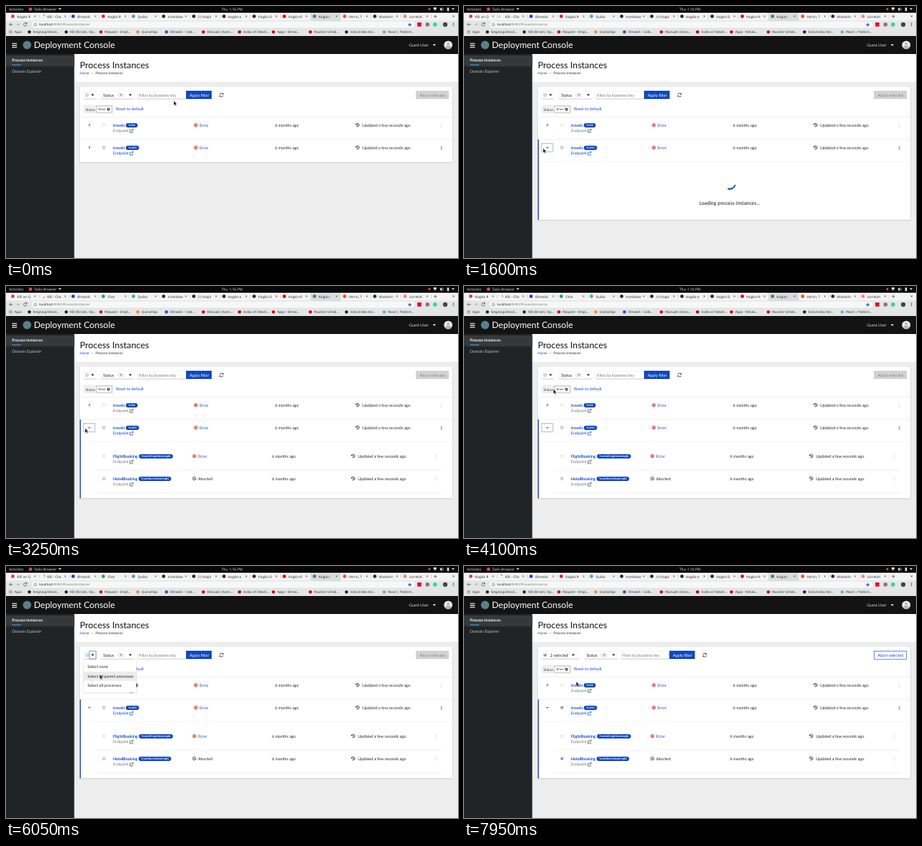
Write an HTML page that moves like this. It is 600 by 336 pixels and loops after 8000 ms.

```html
<!DOCTYPE html>
<html lang="en">
<head>
<meta charset="utf-8">
<title>Process Instances</title>
<style>
  html, body { margin: 0; width: 100%; height: 100%; overflow: hidden; background: #ededed; }
  svg { display: block; width: 100vw; height: 100vh; }
  text { font-family: Lato, sans-serif; white-space: pre; text-rendering: geometricPrecision; }
  .ui { font-family: "Noto Sans", sans-serif; }
  .mono { font-family: "Noto Sans Mono", monospace; }
</style>
</head>
<body>
<svg viewBox="0 0 600 336">
  <g id="scene"></g>
  <path id="tabSpinner" d="M0-2.2A2.2 2.2 0 0 1 2.2 0" fill="none" stroke="#777" stroke-width=".8"/>
  <path id="spinner" d="M0-8A8 8 0 0 1 8 0" fill="none" stroke="#1048c0" stroke-width="1.8"/>
  <path id="cursor" d="M0 0V6.2L1.4 5 2.4 7.2 3.4 6.7 2.5 4.6H4.3Z" fill="#111" stroke="#fff" stroke-width=".4"/>
</svg>
<script>
const LOOP = 8000;
const BLUE = '#1048c0', INK = '#222', GREY = '#777', RED = '#c9190b', CHROME = '#e4e6e6', DARK = '#24292e';
const $ = id => document.getElementById(id);

// Shape helpers, each returning SVG markup
const rect = (x, y, w, h, fill, extra = '') =>
  `<rect x="${x}" y="${y}" width="${w}" height="${h}" fill="${fill}" ${extra}/>`;
const frame = (x, y, w, h, stroke, fill = 'none', width = .6) =>
  rect(x, y, w, h, fill, `stroke="${stroke}" stroke-width="${width}"`);
const dot = (x, y, r, fill) => `<circle cx="${x}" cy="${y}" r="${r}" fill="${fill}"/>`;
const line = (d, stroke, width = .7) =>
  `<path d="${d}" fill="none" stroke="${stroke}" stroke-width="${width}"/>`;
const text = (x, y, str, fill = INK, size = 5.3, extra = '') =>
  `<text x="${x}" y="${y}" fill="${fill}" font-size="${size}" ${extra}>${str}</text>`;
const ui = (x, y, str, fill = '#333', size = 4.4) => text(x, y, str, fill, size, 'class="ui"');
const caret = (x, y, fill = INK) => `<path d="M${x - 2} ${y - 1}h4l-2 2.3z" fill="${fill}"/>`;
const shadow = (x, y, w, h) =>
  rect(x - .7, y, w + 1.4, h + 1.2, '#000', 'opacity=".1"') + rect(x, y, w, h, '#fff');

function checkbox(x, y, enabled, checked) {
  return frame(x - 1.7, y - 1.7, 3.4, 3.4, enabled ? '#b0b0b0' : '#ddd', enabled ? '#dcdcdc' : '#f4f4f4', .5)
    + (checked ? line(`M${x - 1.2} ${y}l1 1.1 1.7-2.2`, INK, .9) : '');
}

function kebab(x, y, enabled) {
  return [-1.8, 0, 1.8].map(d => dot(x, y + d, .6, enabled ? INK : '#bbb')).join('');
}

function historyIcon(x, y) {
  return line(`M${x - 2} ${y - 1.2}A2.2 2.2 0 1 1 ${x - 1.6} ${y + 1.5}M${x} ${y - 1.3}v1.5l1 .6`, INK, .75)
    + `<path d="M${x - 2.8} ${y - 2.4}v2.1h2.1z" fill="${INK}"/>`;
}

function linkIcon(x, y, stroke) {
  return line(`M${x} ${y - 1.3}h-2v3.7h3.7v-1.8M${x - .4} ${y + .8}l2.6-2.9M${x + .6} ${y - 2.2}h1.8v1.8`, stroke, .65);
}

const errorIcon = (x, y) =>
  `<circle cx="${x}" cy="${y}" r="2.1" fill="none" stroke="${RED}" stroke-width=".8"/>`
  + line(`M${x - .9} ${y - .9}l1.8 1.8m0-1.8l-1.8 1.8`, RED, .9);
const abortedIcon = (x, y) =>
  `<circle cx="${x}" cy="${y}" r="2.1" fill="none" stroke="${INK}" stroke-width=".7"/>`
  + line(`M${x - 1.4} ${y - 1.4}l2.8 2.8`, INK);

function browser(s) {
  const tabs = [
    ['#d44638', s.mailTitle], [null, 'KIE - Cha'], ['#2b3fb0', 'Elmwick'],
    s.chat ? ['#25a06b', 'Chat'] : ['#e0185e', 'Kogito R'], ['#37b58b', 'Quibo'],
    [DARK, 'markdow'], [DARK, '(1) Kogit'], [DARK, 'kogito-a'], [DARK, 'Kogito D'],
    ['#d00', 'Kogito-R'], ['#4d7480', 'Kogito -'], ['#ee4b2b', 'Verrin, T'],
    [DARK, 'Masterin'], ['#f08080', 'correlati']
  ];
  const bookmarks = [
    [11, 'Apps', null], [36, 'kiegroup/drool…', DARK], [85, 'KIE (Drools, Op…', DARK],
    [131, 'Request - Empl…', '#c8102e'], [180, 'Quincelop', '#f28c28'], [218, 'Elmwick - Cale…', '#2b50c0'],
    [267, 'Manuals Overv…', '#d00'], [315, 'Index of /devel…', '#b00'], [360, 'Apps - Elmwi…', '#d00'],
    [409, 'Routine Sched…', '#d00'], [457, 'Data Index Ser…', DARK], [507, 'React | Pattern…', '#58b6d6']
  ];
  const strip = tabs.map(([color, title], i) => {
    const x = 4 + i * 40.05;
    return (i === 10 ? rect(x - .5, 9, 40.5, 11, '#dadddd') : line(`M${x + 40} 11.5v5`, '#bbb', .5))
      + (color ? dot(x + 5, 13.8, 2.3, color) : '')
      + ui(x + 10.5, 15.5, title, '#333', 4.5)
      + line(`M${x + 33.3} 12.5l2.4 2.4m0-2.4l-2.4 2.4`, '#444', .6);
  }).join('');
  const marks = bookmarks.map(([x, title, color]) =>
    (color ? dot(x - 5, 34.6, 2.2, color) : '') + ui(x, 36.3, title)).join('');
  let apps = '';
  for (let i = 0; i < 9; i++)
    apps += rect(4 + i % 3 * 1.6, 32.4 + Math.floor(i / 3) * 1.6, 1.1, 1.1, ['#e2574c', '#4caf50', '#4285f4'][i % 3]);

  return rect(0, 0, 600, 9, '#080808')
    + ui(4, 5.9, 'Activities', '#ddd', 4.6) + dot(32.5, 4.2, 2.2, '#dd5144')
    + ui(37, 5.9, 'Tavlo Browser', '#ddd', 4.6) + caret(71.5, 4, '#ddd')
    + ui(286, 5.9, 'Thu  1:16 PM', '#ddd', 4.6)
    + dot(562, 4.2, 1.4, '#e8602c')
    + '<path d="M567 2.8q2.5-2 5 0l-2.5 3.5z" fill="#ddd"/>'
    + '<path d="M576 3.2h1.2l1.6-1.4v5l-1.6-1.4h-1.2z" fill="#ddd"/>' + line('M580 2.7q1.4 1.6 0 3.2', '#ddd', .6)
    + rect(585.5, 2.2, 2.5, 4.5, '#ddd') + caret(593.5, 4, '#ddd')
    + rect(0, 9, 600, 11, '#f4f4f4') + strip
    + line('M570 12v4m-2-2h4', '#444') + line('M593 12.5l2.4 2.4m0-2.4l-2.4 2.4', '#444')
    + rect(0, 19.5, 600, 20.5, CHROME)
    + line('M9 24.7H4.5m2-2l-2 2 2 2', '#444') + line('M13.5 24.7H18m-2-2l2 2-2 2', '#aaa')
    + line('M27.5 23.2A2.2 2.2 0 1 0 27.8 25.4M27.8 22v1.8H26', '#444')
    + rect(34, 20.8, 509, 8.2, '#f6f7f7', 'rx="4"')
    + '<circle cx="39" cy="24.8" r="1.9" fill="none" stroke="#666" stroke-width=".5"/>' + line('M39 24.4v1.5', '#666', .6)
    + ui(44, 26.4, 'localhost:<tspan fill="#777">9000/ProcessInstances</tspan>', INK)
    + '<path d="M536 22l.8 1.9 2 .1-1.6 1.3.6 2-1.8-1.1-1.8 1.1.6-2-1.6-1.3 2-.1z" fill="#3367d6"/>'
    + rect(546, 22, 5.4, 5.4, '#d9103f') + dot(559.5, 24.7, 2.6, '#8a7478')
    + dot(569.5, 24.7, 2.7, '#2fd9a4') + dot(583, 24.7, 3, '#344a42') + kebab(594, 24.7, true)
    + apps + marks;
}

function shell() {
  return rect(0, 40, 600, 24, '#131313')
    + [49.5, 52, 54.5].map(y => rect(8, y, 6.5, 1.1, '#fff')).join('')
    + dot(28, 52, 5.5, '#58808c')
    + text(37, 56.3, 'Deployment Console', '#fff', 11.7)
    + text(535, 53.8, 'Guest User', '#ddd', 5.3) + caret(568.5, 52, '#fff')
    + dot(587, 52, 5.6, '#eee') + dot(587, 50.3, 1.9, '#b5b5b5')
    + '<path d="M583 55.5q0-3 4-3t4 3q-4 3.5-8 0" fill="#b5b5b5"/>'
    + rect(90, 64, 510, 272, '#ededed') + rect(90, 64, 510, 37, '#fff')
    + rect(0, 64, 90.6, 272, '#212427') + rect(0, 66, 90.6, 14.5, '#36393c')
    + text(8, 74.2, 'Process Instances', '#fff', 5.2, 'font-weight="700"') + rect(8, 78, 12, 1.1, '#2b9af3')
    + text(8, 89.2, 'Domain Explorer', '#c4c6c8')
    + text(98, 82.8, 'Process Instances', '#151515', 11.9)
    + text(98, 91.4, 'Home', BLUE, 4.7) + line('M114 88.3l1.4 1.5-1.4 1.5', '#888', .5)
    + text(119, 91.4, 'Process instances', INK, 4.7);
}

function toolbar(s) {
  const dx = s.selected ? 33.5 : 0;
  const field = (x, w) => frame(x, 113.2, w, 10.8, '#eee', '#fff', .5) + line(`M${x} 124h${w}`, '#aaa', .5);
  return field(103, 16.5 + dx) + checkbox(107.5, 118.7, true, s.selected)
    + (s.selected ? text(114.5, 120.6, '2 selected') : '') + caret(115 + (s.selected ? 30 : 0), 118.6)
    + (s.menu ? frame(110.7, 113.2, 8.8, 10.8, '#2b78d0') : '')
    + field(126 + dx, 44) + text(129 + dx, 120.6, 'Status')
    + rect(147.5 + dx, 115.8, 9.5, 5.8, '#ececec', 'rx="2.9"') + text(151.2 + dx, 120.1, '1', INK, 4.2)
    + caret(165 + dx, 118.6)
    + field(174.5 + dx, 64) + text(176.5 + dx, 120.6, 'Filter by business key', GREY)
    + rect(239 + dx, 113, 34, 11, BLUE) + text(243.8 + dx, 120.6, 'Apply filter', '#fff')
    + line(`M${283.6 + dx} 118.2A2.3 2.3 0 0 1 ${287.7 + dx} 117.2M${288.4 + dx} 119.2A2.3 2.3 0 0 1 ${284.3 + dx} 120.2`, INK)
    + `<path d="M${288.6 + dx} 115.8v2.2h-2.2zM${283.4 + dx} 121.6v-2.2h2.2z" fill="${INK}"/>`
    + (s.selected ? frame(544.3, 113.4, 43.3, 10.8, BLUE, '#fff') : rect(544, 113, 43.8, 11, '#d2d2d2'))
    + text(549, 120.6, 'Abort selected', s.selected ? BLUE : '#858585')
    + rect(103, 132, 39.5, 11.5, '#efefef') + text(105.5, 139.5, 'Status', '#444', 4.8)
    + frame(120.3, 133.4, 20, 8.6, '#999', '#fff', .5) + text(123, 139.2, 'Error', INK, 4.2)
    + dot(136, 137.7, 2, '#444') + line('M135.2 136.9l1.6 1.6m0-1.6l-1.6 1.6', '#fff', .5)
    + text(146, 139.3, 'Reset to default', BLUE);
}

// One process row; nested rows sit slightly further left in the later columns
function processRow({ y, name, pillX, key, aborted, enabled, active, checked, nested }) {
  const [iconX, agoX, updatedX, kebabX] = nested ? [250, 353, 467.3, 571] : [252, 357, 473, 578];
  return checkbox(130, y - .3, enabled, checked)
    + text(142, y + 1.6, name, BLUE, 5.3, 'font-weight="700"')
    + rect(pillX, y - 2.7, key.length * 1.83 + 6.7, 5.6, BLUE, 'rx="2.8"')
    + text(pillX + 3.2, y + 1.2, key, '#fff', 3.1, 'class="mono" font-weight="700"')
    + text(142, y + 9.3, 'Endpoint', active ? BLUE : GREY) + linkIcon(166.5, y + 7.4, active ? BLUE : '#444')
    + (aborted ? abortedIcon : errorIcon)(iconX, y - .2)
    + text(iconX + 5, y + 1.7, aborted ? 'Aborted' : 'Error', aborted ? INK : BLUE)
    + text(agoX, y + 1.7, '6 months ago') + historyIcon(updatedX - 6.3, y - .2)
    + text(updatedX, y + 1.7, 'Updated a few seconds ago') + kebab(kebabX, y + .3, active);
}

function table(s) {
  const bottom = !s.open ? 208 : s.loaded ? 283 : 285;
  let out = shadow(98, 108, 494.5, bottom - 108) + toolbar(s)
    + line('M98 148h494.5M98 178h494.5', '#e4e4e4', .6)
    + line('M110 157l1.5 1.6-1.5 1.6', INK, .9)
    + processRow({ y: 159, name: 'travels', pillX: 159, key: 'Ti234' })
    + processRow({ y: 189, name: 'travels', pillX: 159, key: 'Tra234', enabled: true, active: true, checked: s.selected })
    + line(s.open ? 'M109 188l1.6 1.5 1.6-1.5' : 'M110 187l1.5 1.6-1.5 1.6', INK, .9)
    + (s.focus ? frame(103, 183.3, 15, 11, '#8a9fd0', 'none', .7) : '');
  if (s.open) out += line('M99 208h493', '#eee', .6) + rect(98, 178, 1.3, bottom - 178, BLUE);
  if (s.open && !s.loaded)
    out += text(352.5, 265, 'Loading process instances...', '#151515', 6.7, 'text-anchor="middle"');
  if (s.loaded) {
    out += line('M120 246h459M120 276h459', '#e4e4e4', .6)
      + processRow({ y: 227, name: 'FlightBooking', pillX: 176.5, key: 'Tra234FlightBooking01', nested: true })
      + processRow({ y: 257, name: 'HotelBooking', pillX: 176, key: 'Tra234HotelBooking01', nested: true,
        aborted: true, enabled: true, checked: s.selected });
  }
  return out;
}

function menu(s) {
  const items = ['Select none', 'Select all parent processes', 'Select all processes'];
  return shadow(103, 125.5, 70, 43) + items.map((label, i) =>
    (s.hover === i ? rect(103, 128.3 + i * 12.5, 70, 12.3, '#ececec') : '')
    + text(108.3, 136.3 + i * 12.5, label)).join('');
}

// Pointer path: [time, x, y]
const path = [
  [0, 222.7, 126.3], [150, 222.7, 126.3], [800, 105, 189.5], [3400, 105, 189.5], [4050, 118.7, 137.5],
  [4150, 118.7, 137.5], [4650, 111.7, 125.5], [5500, 111.7, 125.5], [6500, 133.7, 158.5],
  [7200, 133.7, 158.5], [7800, 149, 154], [LOOP, 149, 154]
];

function pointerAt(t) {
  const i = path.findIndex(p => p[0] > t);
  const [t0, x0, y0] = path[i - 1], [t1, x1, y1] = path[i];
  const u = (t - t0) / (t1 - t0), k = u * u * (3 - 2 * u);
  return [x0 + (x1 - x0) * k, y0 + (y1 - y0) * k];
}

function stateAt(t, pointerY) {
  const between = (a, b) => t >= a && t < b;
  const isMenu = between(4750, 7250);
  return {
    focus: between(900, 4750), open: t >= 1400, loaded: t >= 3000,
    menu: isMenu, selected: t >= 7250,
    hover: isMenu ? Math.floor((pointerY - 128.3) / 12.5) : -1,
    chat: between(1700, 7400),
    mailTitle: between(600, 3300) || between(4700, 7400) ? 'KIE on Q' : 'Kogito R'
  };
}

let shown = '';
function draw() {
  const t = performance.now() % LOOP;
  const [x, y] = pointerAt(t);
  const s = stateAt(t, y), key = JSON.stringify(s);
  if (key !== shown) {
    $('scene').innerHTML = browser(s) + shell() + table(s) + (s.menu ? menu(s) : '');
    shown = key;
  }
  $('cursor').setAttribute('transform', `translate(${x} ${y})`);
  $('tabSpinner').setAttribute('transform', `translate(49 13.8) rotate(${t * .36})`);
  $('spinner').setAttribute('transform', `translate(352.5 236) rotate(${(t - 2300) * .36})`);
  $('spinner').style.display = s.open && !s.loaded ? '' : 'none';
  requestAnimationFrame(draw);
}
draw();
</script>
</body>
</html>
```
